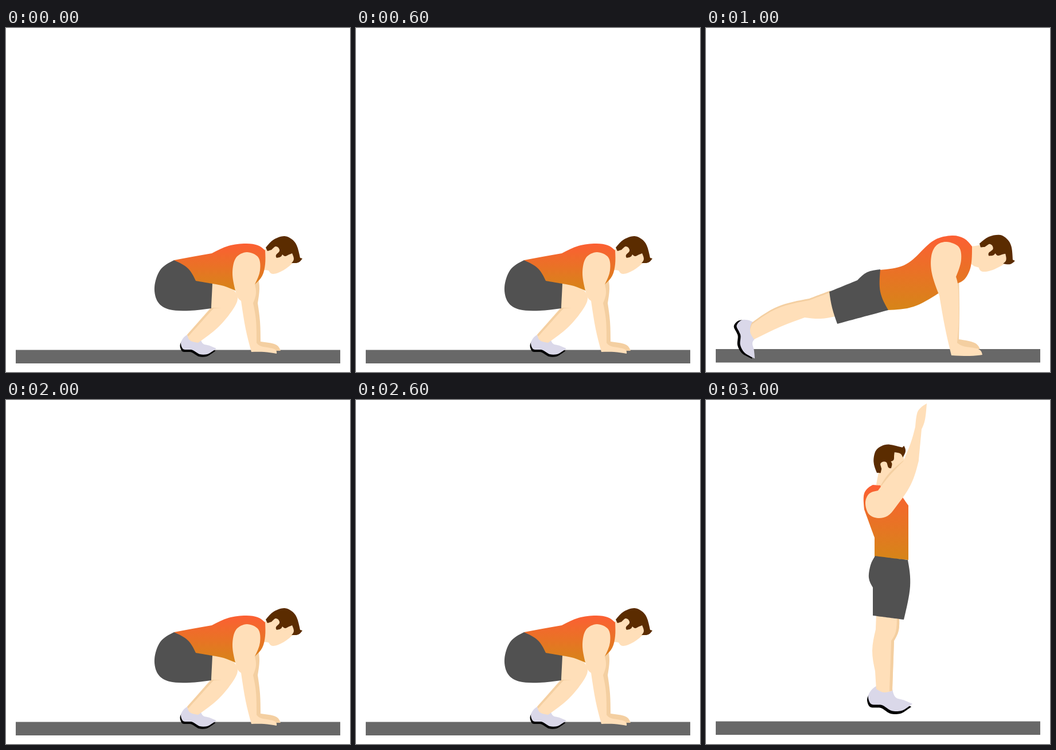
Write an HTML page with a canvas that moves like this. It is 600x600 px and loops after 4 s.

```html
<!DOCTYPE html>
<html lang="en">
<head>
<meta charset="utf-8">
<title>Burpee exercise</title>
<style>
html, body { margin: 0; width: 100%; height: 100%; overflow: hidden; background: #fff; }
canvas { display: block; width: 100vw; height: 100vh; }
</style>
</head>
<body>
<canvas id="stage" width="600" height="600"></canvas>
<script>
const ctx = document.getElementById('stage').getContext('2d');

const SKIN = '#ffdfb9', SHADE = '#f4cfa1', HAIR = '#5b2c00';
const SHORTS = '#515151', SHOE = '#dad8e9', SOLE = '#000', FLOOR = '#686868';

const toward = (a, b, k) => ({ x: a.x + (b.x - a.x) * k, y: a.y + (b.y - a.y) * k });
const slope = (at, from, to, k) => ({ x: at.x + (to.x - from.x) * k, y: at.y + (to.y - from.y) * k });

// Closed outline: smooth through the points, sharp at those marked "!"
function shape(fill, outline) {
  const pts = outline.split(' ').map(s => {
    const [x, y] = s.split(',').map(parseFloat);
    return { x, y, sharp: s.endsWith('!') };
  });
  const n = pts.length;
  ctx.beginPath();
  ctx.moveTo(pts[0].x, pts[0].y);
  pts.forEach((a, i) => {
    const b = pts[(i + 1) % n];
    let c1 = a.sharp ? null : slope(a, pts[(i + n - 1) % n], b, 1 / 6);
    let c2 = b.sharp ? null : slope(b, pts[(i + 2) % n], a, 1 / 6);
    if (!c1) c1 = toward(a, c2 || b, 0.5);
    if (!c2) c2 = toward(b, a.sharp ? a : c1, 0.5);
    ctx.bezierCurveTo(c1.x, c1.y, c2.x, c2.y, b.x, b.y);
  });
  ctx.fillStyle = fill;
  ctx.fill();
}

function place(x, y, angle, scale, paint) {
  ctx.save();
  ctx.translate(x, y);
  ctx.rotate(angle * Math.PI / 180);
  ctx.scale(scale, scale);
  paint();
  ctx.restore();
}

function shirt(top, bottom, outline) {
  const g = ctx.createLinearGradient(0, top, 0, bottom);
  g.addColorStop(0, '#fc5f33');
  g.addColorStop(1, '#d68518');
  shape(g, outline);
}

function floor(y) {
  ctx.fillStyle = FLOOR;
  ctx.fillRect(17, y, 566, 23.5);
}

function head() {
  shape(SKIN, '-19,9! 3,2! 20,-4! 45,9! 50,20 46,28 30,40 13,46 5,40! -3,39! -9,36!');
  shape(HAIR, '0,0! 14,-14 32,-20 45,-15 54,-4 60,18! 64,19! 57,26 45,27! 49,20 46,10! 41,12 34,15 29,12! 26,16 19,18! 18,13 24,6 22,0 17,-2 13,1 10,4! 3,6!');
}

function shoe() {
  const outline = '0,0! -7,6 -11,15 -7,25 3,26 10,27 22,34 35,34 44,29 51,24! 39,19 27,15 22,1!';
  place(-1.5, 4, 0, 1, () => shape(SOLE, outline));
  shape(SHOE, outline);
}

function squat() {
  floor(561.5);
  place(316, 535, 0, 1, shoe);
  shape(SKIN, '357,445! 380,448 397,457 404,472 395,492 370,522 335,549! 321,545 316,535! 357,488!');
  shape(SHADE, '316,535! 358,488! 376,488! 362,489! 318,538!');
  place(453, 383, 0, 1, head);
  shape(SHADE, '440,436! 442,455 439,480! 443,512 444,547! 470,552 479,563! 465,563! 434,553! 425,440!');
  shirt(376, 458, '293,405! 325,399 359,393! 388,380 418,376 439,379 452,388! 452,412 447,432 434,447! 400,458! 380,450 360,446! 328,446! 300,420!');
  shape(SHORTS, '293,405! 317,419 331,441! 360,446! 358,489! 320,493 285,491 265,478 259,452 269,422');
  shape(SKIN, '434,447! 436,463 431,480! 436,510 437,549! 445,555 468,560 472,568! 450,565 428,565! 418,525 410,476! 404,470 400,458! 395,427 401,401 420,391 440,400 443,423');
}

function plank() {
  const leg = '217,461! 180,475! 125,489 80,517! 77,530 84,543! 130,521 172,505! 200,507 226,503!';
  floor(560);
  place(82, 513, 62, 1.127, shoe);
  place(0, -3, 0, 1, () => shape(SHADE, leg));
  shape(SKIN, leg);
  place(477, 376, 9.3, 1.03, head);
  shape(SHADE, '432,436! 441,432! 442,490 441,543! 468,549 478,560! 433,556!');
  shirt(362, 492, '303,422! 345,414 375,390! 400,369 429,362 450,367 464,381! 462,415 452,437 437,446! 405,463! 362,486 317,492! 303,462');
  shape(SHORTS, '304,421! 304,460 318,492! 229,516! 220,488 215,460! 264,440! 281,426');
  shape(SKIN, '436,434! 440,455 441,505 438,549! 449,555 475,560 482,570! 460,572 428,571! 417,523 407,467! 394,428 393,398 402,379 420,373 441,382 445,405');
}

function jump() {
  floor(560.5);
  place(297, 499, 1, 1.25, shoe);
  shape(SKIN, '297,374! 337,378! 336,402 328,420! 325,507! 310,510 297,504! 295,473! 290,437 296,400!');
  shape(SHADE, '333,380! 337,380! 336,402 328,420! 325,507! 320,508! 323,420! 331,404');
  place(298, 127, -61.5, 1, head);
  shirt(148, 278, '291,148! 305,149! 341,167! 353,184! 353,279! 294,274! 294,240! 276,191! 275,168 280,156');
  shape(SHORTS, '295,272! 318,275! 352,279! 356,325 345,383! 291,376! 291,327! 284,310 287,288');
  shape(SHADE, '345,105! 320,127 304,150! 310,156! 344,115!');
  shape(SKIN, '385,6! 374,14 368,24 365,47! 357,75 344,107! 320,132 300,158! 284,164 278,180 284,199 300,206 317,202 330,188! 357,148 371,106! 376,51! 382,34');
}

const STEP = 1000;
const poses = [squat, plank, squat, jump];
const start = performance.now();

function tick() {
  const t = performance.now() - start;
  ctx.fillStyle = '#fff';
  ctx.fillRect(0, 0, 600, 600);
  poses[Math.floor(t / STEP) % poses.length]();
  requestAnimationFrame(tick);
}
tick();
</script>
</body>
</html>
```
